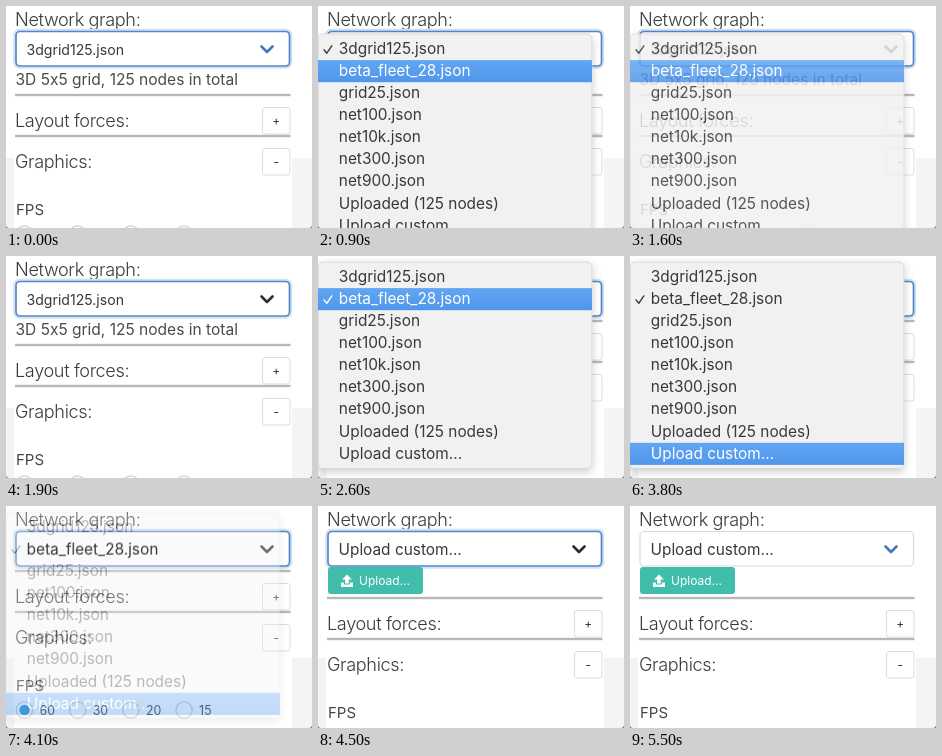
An HTML page for the animation above (5.6 s loop, 306 by 222 pixels).

```html
<!DOCTYPE html>
<html lang="en">
<head>
<meta charset="utf-8">
<title>Network graph settings</title>
<style>
  html, body { margin: 0; width: 100%; height: 100%; overflow: hidden; background: #fff; }
  svg { display: block; width: 306px; height: 222px; font-family: Inter, Roboto, sans-serif; }
  .title { font-size: 18.1px; font-weight: 300; letter-spacing: -.02em; fill: #3c3c3c; }
  .note { font-size: 15.55px; fill: #4a4a4a; }
  .item { font-size: 15.4px; fill: #383838; }
</style>
</head>
<body>
<svg id="stage" viewBox="0 0 306 222">
  <defs>
    <linearGradient id="blue" x1="0" y1="0" x2="0" y2="1">
      <stop offset="0" stop-color="#62a6f2"/>
      <stop offset="1" stop-color="#4f96ec"/>
    </linearGradient>
    <filter id="shadow" x="-10%" y="-10%" width="120%" height="125%">
      <feDropShadow dx="0" dy="3" stdDeviation="4" flood-color="#000" flood-opacity=".2"/>
    </filter>
  </defs>
</svg>
<script>
const LOOP = 5600, STEP = 100, ROW = 22.1;
const FILES = ['3dgrid125.json', 'beta_fleet_28.json', 'grid25.json', 'net100.json',
  'net10k.json', 'net300.json', 'net900.json', 'Uploaded (125 nodes)', 'Upload custom...'];
const INK = '#383838';
const stage = document.getElementById('stage');

function add(parent, tag, attrs, text) {
  const el = document.createElementNS('http://www.w3.org/2000/svg', tag);
  set(el, attrs);
  if (text) el.textContent = text;
  parent.appendChild(el);
  return el;
}
function set(el, attrs) {
  for (const k in attrs) el.setAttribute(k, attrs[k]);
}
const show = (el, on) => set(el, { visibility: on ? 'visible' : 'hidden' });
const label = (parent, x, y, cls, text) => add(parent, 'text', { x, y, class: cls }, text);
const rect = (parent, x, y, width, height, attrs) =>
  add(parent, 'rect', { x, y, width, height, ...attrs });

// Page margins
rect(stage, 0, 0, 306, 222, { fill: '#fff' });
for (const [x, w] of [[0, 8], [286, 20]]) rect(stage, x, 152, w, 70, { fill: '#f3f4f4' });

label(stage, 9, 19.5, 'title', 'Network graph:');

// Select box
const ring = rect(stage, 8.5, 24, 276.5, 37.5,
  { rx: 5, fill: 'none', stroke: '#d3e2f2', 'stroke-width': 2.5 });
const box = rect(stage, 10, 25.5, 273.5, 34.5, { rx: 4, fill: '#fff' });
const value = label(stage, 20.5, 49, 'item', '');
const chevron = add(stage, 'path', { d: 'M255.5 40.5l5.5 5.5 5.5-5.5', fill: 'none',
  'stroke-width': 2.6, 'stroke-linecap': 'round', 'stroke-linejoin': 'round' });

const note = label(stage, 9.5, 79, 'note', '3D 5x5 grid, 125 nodes in total');

// Upload button
const upload = add(stage, 'g', {});
rect(upload, 10, 61, 95, 27, { rx: 3, fill: '#40beab' });
add(upload, 'path', { d: 'M29 68.5l4.8 5h-3v4h-3.6v-4h-3z M23 76.5h3v2h6v-2h3v4.5h-12z', fill: '#fff' });
add(upload, 'text', { x: 41, y: 79, 'font-size': 12, fill: '#fff' }, 'Upload...');

// Sections below the select
const lower = add(stage, 'g', {});
for (const [y, name, sign] of [[89, 'Layout forces:', '+'], [130, 'Graphics:', '-']]) {
  rect(lower, 9, y - 1.2, 275.5, 2.4, { fill: '#b8b8b8' });
  label(lower, 9, y + 32, 'title', name);
  rect(lower, 256.5, y + 12.5, 27.5, 26.5, { rx: 2.5, fill: '#fff', stroke: '#dcdcdc' });
  add(lower, 'text', { x: 270.2, y: y + 30, 'font-size': 12, fill: '#333', 'text-anchor': 'middle' }, sign);
}
add(lower, 'text', { x: 10, y: 209, 'font-size': 15, fill: '#444' }, 'FPS');
[60, 30, 20, 15].forEach((fps, i) => {
  const x = 18.5 + i * 53.2;
  add(lower, 'circle', { cx: x, cy: 228, r: 8.2, fill: '#fff', stroke: '#cfcfcf', 'stroke-width': 1.3 });
  if (!i) add(lower, 'circle', { cx: x, cy: 228, r: 5.2, fill: '#3299cf' });
  add(lower, 'text', { x: x + 15, y: 233, 'font-size': 12.4, fill: '#444' }, fps);
});

// Dropdown menu, first row centred at y = 0
const menu = add(stage, 'g', {});
rect(menu, 0, -15, 274, 206.5,
  { rx: 5, fill: '#f1f1f1', stroke: '#d2d2d2', 'stroke-width': .8, filter: 'url(#shadow)' });
const bar = rect(menu, 0, 0, 274, ROW, { fill: 'url(#blue)' });
const rows = FILES.map((name, i) => label(menu, 20.8, i * ROW + 4.8, 'item', name));
const tick = add(menu, 'path', { d: 'M6 .8l2.8 3.4 5-7.4', fill: 'none', 'stroke-width': 1.4,
  'stroke-linecap': 'round', 'stroke-linejoin': 'round' });

// Rounded window corners
add(stage, 'path', { d: 'M0 218.5Q0 222 3.5 222H0z M306 218.5Q306 222 302.5 222H306z', fill: '#777' });

const clamp = v => Math.max(0, Math.min(1, v));
function mix(a, b, k) {
  return `rgb(${a.map((v, i) => Math.round(v + (b[i] - v) * k))})`;
}

// Each opening: first row centre, ticked row, pick time, highlighted row over time
const OPENINGS = [
  { from: 100, pick: 1400, y: 43, ticked: 0, hover: t => t < 700 ? 0 : 1 },
  { from: 2400, pick: 3700, y: 21, ticked: 1,
    hover: t => 1 + Math.round(7 * clamp((t - 2800) / 600)) }
];

function drawMenu(t) {
  const open = OPENINGS.find(o => t >= o.from && t < o.pick + 500);
  show(menu, open);
  if (!open) return;
  const since = t - open.pick;
  const active = since >= 0 && since < STEP ? -1 : open.hover(t);
  const alpha = since < 200 ? 1 : .85 - .25 * (since - 200) / STEP;
  set(menu, { transform: `translate(0 ${open.y})`, opacity: alpha });
  set(bar, { y: active * ROW - 11, opacity: active < 0 ? 0 : 1 });
  rows.forEach((row, i) => { row.style.fill = i === active ? '#fff' : INK; });
  set(tick, { transform: `translate(0 ${open.ticked * ROW})`,
    stroke: open.ticked === active ? '#fff' : INK });
}

function draw(ms) {
  const t = Math.floor((ms % LOOP) / STEP) * STEP;
  const chosen = t < 2200 ? 0 : t < 4300 ? 1 : 8;
  const blur = clamp((t - 4600) / 600);

  value.textContent = FILES[chosen];
  value.style.fontSize = chosen ? '15.4px' : '14.1px';
  show(note, chosen === 0);
  show(upload, chosen === 8);
  set(lower, { transform: `translate(0 ${chosen === 0 ? 0 : chosen === 1 ? -24 : 3})` });

  set(ring, { opacity: 1 - blur });
  set(box, { stroke: mix([84, 135, 197], [216, 216, 216], blur), 'stroke-width': 1.7 - .6 * blur });
  set(chevron, { stroke: t < 100 ? '#4777b8' : mix([45, 45, 45], [71, 119, 184], blur) });
  drawMenu(t);
}

const start = performance.now();
function animate() {
  draw(performance.now() - start);
  requestAnimationFrame(animate);
}
animate();
</script>
</body>
</html>
```
